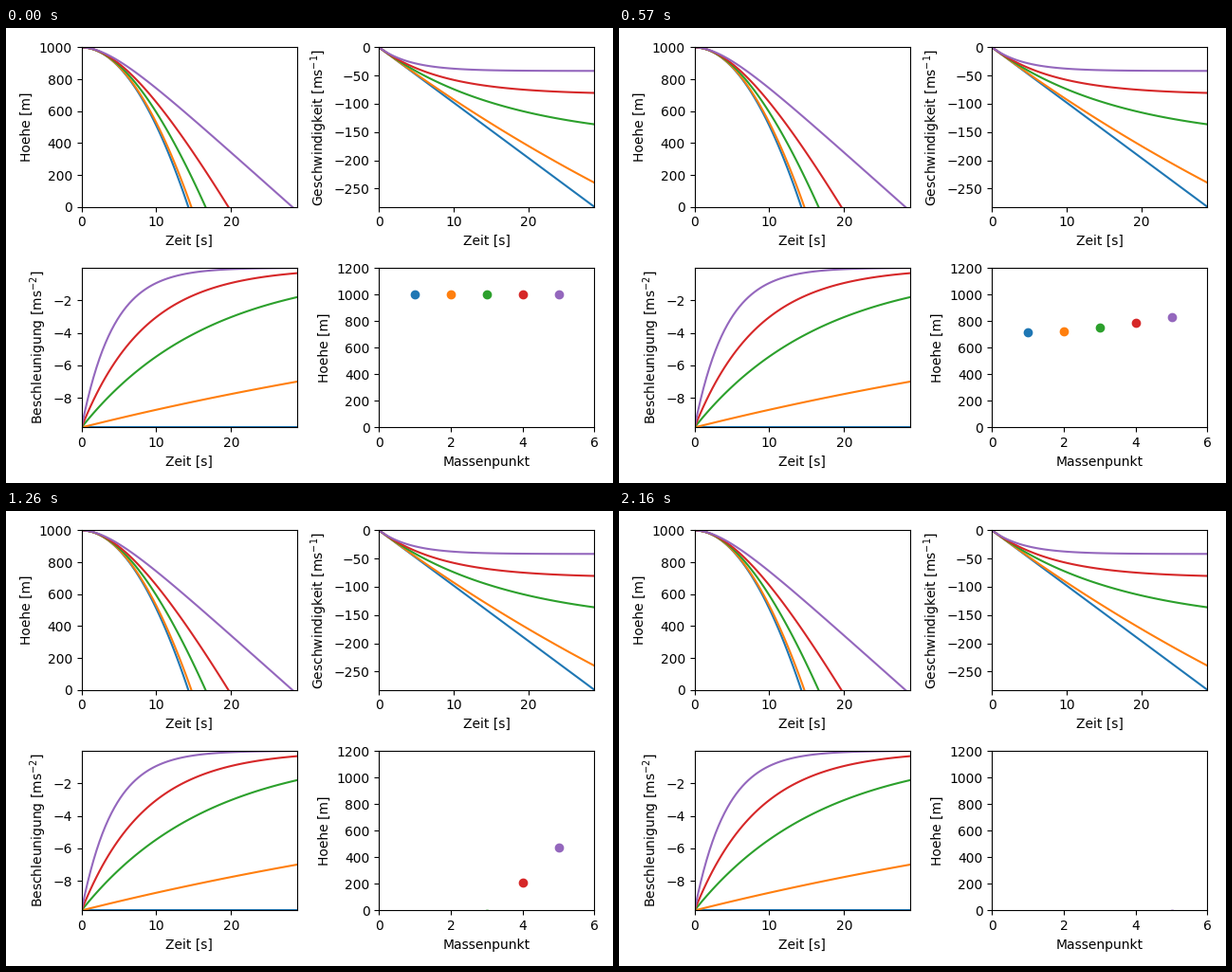
A matplotlib script that plays this animation: 640 by 480 pixels, repeating every 2190 ms.

```python
import numpy as np
import matplotlib.pyplot as plt
from matplotlib.animation import FuncAnimation

plt.rcParams["font.family"] = "DejaVu Sans"

W, H = 640, 480
G = 9.81        # gravity
H0 = 1000       # drop height
DT = 0.4        # simulated seconds per frame
FRAMES = 73
TAU = 85.2      # relaxation time of the weakest drag
DRAG = [0, 1, 5, 10, 20]

t = np.arange(FRAMES) * DT


def fall(drag):
    """Height, velocity and acceleration with linear drag."""
    if drag == 0:
        return H0 - G * t**2 / 2, -G * t, np.full_like(t, -G)
    tau = TAU / drag
    decay = np.exp(-t / tau)
    height = H0 - G * tau * (t - tau * (1 - decay))
    return height, -G * tau * (1 - decay), -G * decay


def place_axes(left, right, top, bottom, gap_x, gap_y):
    """Set the 2x2 grid from pixel edges and gaps."""
    width = (right - left - gap_x) / 2
    height = (bottom - top - gap_y) / 2
    fig.subplots_adjust(left=left / W, right=right / W,
                        top=1 - top / H, bottom=1 - bottom / H,
                        wspace=gap_x / width, hspace=gap_y / height)


runs = [fall(d) for d in DRAG]

fig, axes = plt.subplots(2, 2, figsize=(W / 100, H / 100), dpi=100)
*curve_axes, drop_ax = axes.flat
place_axes(79.6, 620.4, 20.4, 421.4, 86.6, 64.4)

# superscripts make a label taller, so it sits closer to the ticks
labels = [("Hoehe [m]", 4),
          ("Geschwindigkeit [ms$^{-1}$]", 3),
          ("Beschleunigung [ms$^{-2}$]", 3)]
for i, (ax, (label, pad)) in enumerate(zip(curve_axes, labels)):
    ax.margins(0)
    for run in runs:
        ax.plot(t, run[i])
    ax.set_xlabel("Zeit [s]")
    ax.set_ylabel(label, labelpad=pad)
curve_axes[0].set_ylim(0, H0)

dots = [drop_ax.plot([n], [H0], "o")[0] for n in range(1, len(runs) + 1)]
drop_ax.set(xlim=(0, 6), ylim=(0, 1200), xlabel="Massenpunkt", ylabel="Hoehe [m]")
drop_ax.set_yticks(range(0, 1201, 200))


def update(frame):
    for dot, (height, _, _) in zip(dots, runs):
        dot.set_ydata([height[frame]])
    return dots


anim = FuncAnimation(fig, update, frames=FRAMES, interval=30, repeat=True,
                     repeat_delay=0, blit=False)
plt.show()
```
